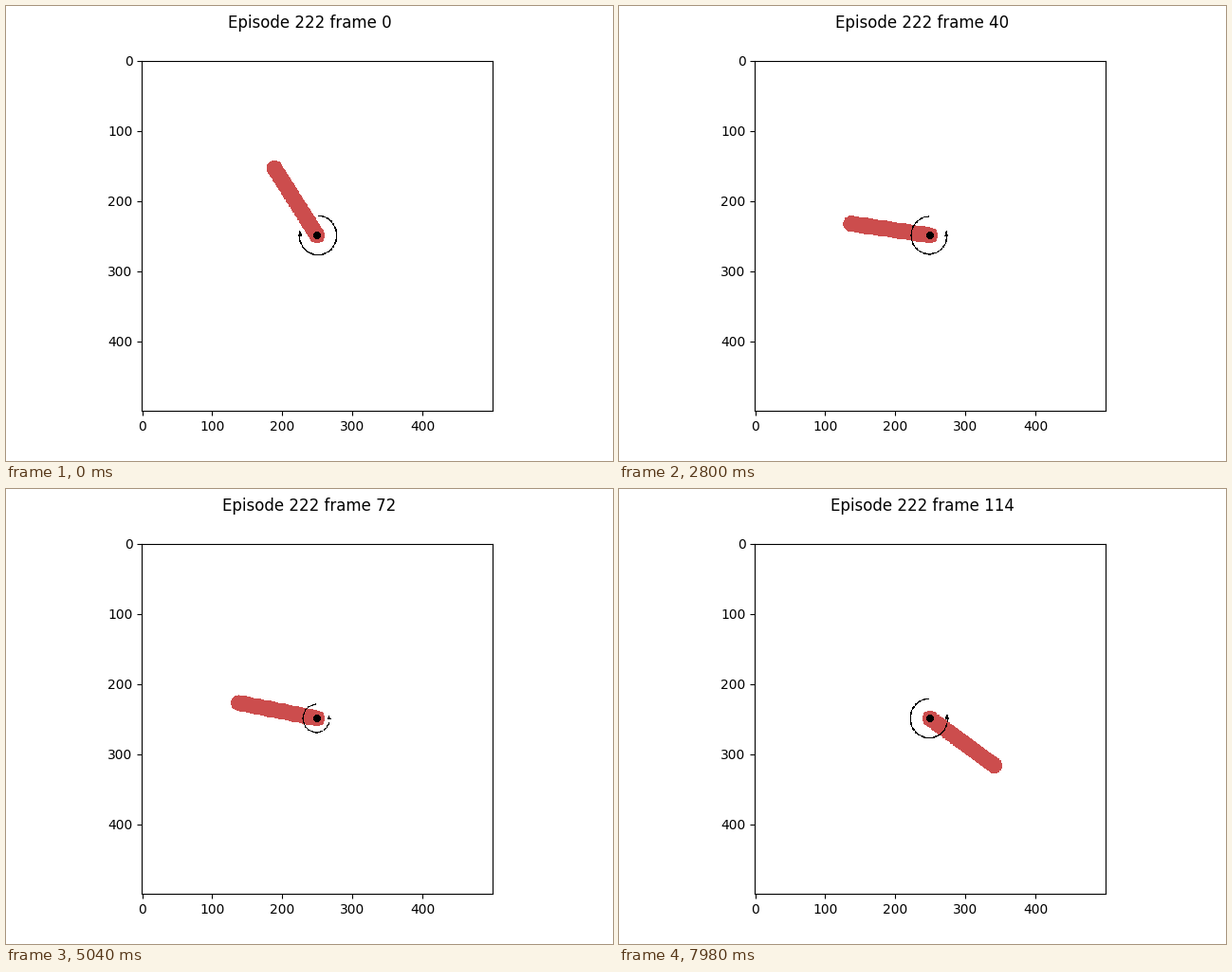
Write a matplotlib script that moves like this. It is 640 px wide and 480 px high and loops after 8 s.

```python
import numpy as np
import matplotlib.pyplot as plt
from matplotlib.animation import FuncAnimation

TICK_MS, STEP_MS, LOOP_MS = 20, 70, 8000
SKIPPED = (31, 62, 111)          # steps where the previous picture is held
SIZE = 500                       # rendered view in pixels
UNIT = SIZE / 4.4                # pixels per world unit
ROD_COLOR = (204, 77, 77)

GRAVITY, MAX_SPEED, STEP_TIME = 10, 8, .05
TOP_SPEED = 1.27                 # angular speed when upright
TURN = 2 * np.pi

# Poses the swing passes: step and angle, counterclockwise from upright.
KEY_STEPS = [0, 12, 24, 40, 57, 72, 88, 98, 110, 114]
KEY_ANGLES = [.565, 2.66, 6.025, 7.707, 12.43, 13.941, 18.588, 19.223,
              21.34, 22.93]


def wrap(angle):
    return (angle + np.pi) % TURN - np.pi


def torque_at(angle):
    """Push on the way down, brake on the way up, let go near the top."""
    phase = wrap(angle)

    def switch(at):
        return 1 + np.tanh((phase - at) / .05)

    return (2 - 2 * switch(-1.66) + switch(-.05)
            - switch(.25) + 2 * switch(1.33))


# Speed along one turn from the energy balance, then the time it takes.
phases = np.linspace(-np.pi, np.pi, 4001)
d_phase = phases[1] - phases[0]
work = np.cumsum(6 * torque_at(phases)) * d_phase
work -= np.interp(0, phases, work)
speed_squared = TOP_SPEED ** 2 + 3 * GRAVITY * (1 - np.cos(phases)) + work
speed = np.sqrt(np.clip(speed_squared, .5, MAX_SPEED ** 2))
travel = np.cumsum(d_phase / speed) / STEP_TIME
travel -= travel[0]
turn_steps = travel[-1]


def moment_of(angle):
    turns, phase = np.divmod(np.asarray(angle) + np.pi, TURN)
    return turns * turn_steps + np.interp(phase - np.pi, phases, travel)


key_moments = moment_of(KEY_ANGLES)


def angle_at(step):
    turns, rest = divmod(np.interp(step, KEY_STEPS, key_moments), turn_steps)
    return turns * TURN + np.interp(rest, travel, phases)


# Pixel centres relative to the pivot, y pointing up.
axis = np.arange(SIZE) + .5 - SIZE / 2
X, Y = np.meshgrid(axis, -axis)


def rod_mask(angle):
    dx, dy = -np.sin(angle), np.cos(angle)
    along = np.clip(X * dx + Y * dy, 0, UNIT)
    return np.hypot(X - along * dx, Y - along * dy) < .1 * UNIT


def arrow_mask(torque):
    """Three-quarter circular arrow, mirrored and scaled by the torque."""
    scale = max(abs(torque) / 2, .05)
    p = X / scale * (1 if torque < 0 else -1) - 1.35
    q = Y / scale
    ring = np.abs(np.hypot(p / 26.6, q / 28) - 1) * 27.3 < .9
    ring &= ~((p < 0) & (q > 0))
    head = (q > -2) & (q < 8) & (np.abs(p + 25.6) < .36 * (8 - q))
    return ring | head


def render(step):
    angle = angle_at(step)
    view = np.full((SIZE, SIZE, 3), 255, dtype=np.uint8)
    view[rod_mask(angle)] = ROD_COLOR
    view[np.hypot(X, Y) < .05 * UNIT] = 0
    view[arrow_mask(torque_at(angle))] = 0
    return view


fig, ax = plt.subplots(figsize=(6.4, 4.8), dpi=100)
image = ax.imshow(render(0), interpolation="nearest")
title = fig.suptitle("Episode 222 frame 0", y=.98 + 1 / 480)
shown = {"step": 0}


def update(tick):
    step = (tick * TICK_MS + TICK_MS // 2) // STEP_MS
    if step in SKIPPED:
        step -= 1
    if step != shown["step"]:
        shown["step"] = step
        image.set_data(render(step))
        title.set_text(f"Episode 222 frame {step}")
    return image, title


anim = FuncAnimation(fig, update, frames=LOOP_MS // TICK_MS,
                     interval=TICK_MS, repeat=True, repeat_delay=0)
plt.show()
```
